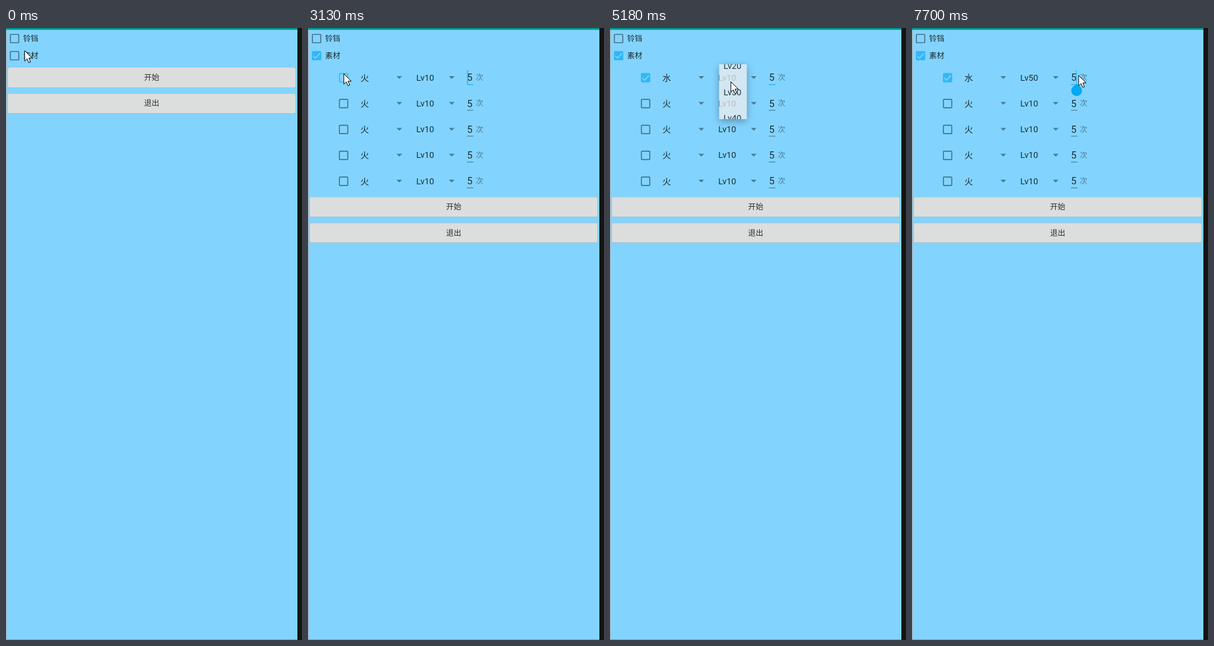
An HTML page for the animation above (8 s loop, 449 px wide and 928 px high).

```html
<!DOCTYPE html>
<html lang="zh">
<head>
<meta charset="utf-8">
<style>
html, body { margin: 0; width: 100%; height: 100%; overflow: hidden; background: #82d4ff; }
svg { display: block; }
#stage { width: 100%; height: 100%; }
text { font-family: Roboto, "Noto Sans CJK SC", "Noto Sans CJK", sans-serif; }
.soft { filter: drop-shadow(0 .7px .7px rgba(0, 0, 0, .42)); }
.deep { filter: drop-shadow(0 3px 6px rgba(0, 0, 0, .42)); }
</style>
</head>
<body>
<svg id="stage" viewBox="0 0 449 928"></svg>
<script>
const LOOP = 8000, BLUE = '#33b7f5', SKY = '#82d4ff', PITCH = 39.25, TOP = 55;
const ROWS = 5, FIRST = 75, BLINK = 480, GLIDE = 220;
const stage = document.getElementById('stage');

// When things get clicked, in ms
const EXPAND = 1820, CHECK_ROW = 3120, TAP = 6750, RETAP = 7550;

const elements = { items: ['火', '水', '雷', '风', '光', '暗', 'mana'], left: 73, width: 46, choice: 1, open: 3605, pick: 4370 };
const levels = { items: [1, 2, 3, 4, 5].map(n => `Lv${n}0`), left: 158, width: 42, choice: 4, open: 5075, pick: 6030 };

// Pointer stops: arrival time, x, y
const stops = [
  [0, 28, 34], [800, 18, 40], [2450, 54, 69], [3400, 88, 76], [4090, 109, 120], [4490, 168, 89],
  [4880, 183, 81], [5600, 200, 262], [5900, 176, 232], [6380, 251, 74], [6650, 246, 71], [7270, 252.5, 71.5]
];

// The caret blinks from the start of each span and freezes when a menu opens
const refocus = menu => menu.pick + 150;
const blinkSpans = [
  [EXPAND, elements.open + 150], [refocus(elements), levels.open], [refocus(levels), RETAP], [RETAP, LOOP]
];

const ramp = (t, from, length) => Math.min(1, Math.max(0, (t - from) / length));
const smooth = k => k * k * (3 - 2 * k);
const latest = (list, t) => list.filter(([at]) => at <= t).pop();
const tickOf = (t, click) => ramp(t, click, 300);
const chosen = (menu, t) => menu.items[t >= menu.pick + 240 ? menu.choice : 0];

const rect = (x, y, w, h, fill, more = '') =>
  `<rect x="${x}" y="${y}" width="${w}" height="${h}" fill="${fill}" ${more}/>`;

const label = (s, x, mid, size, ink = .8, more = '') =>
  `<text x="${x}" y="${mid + size * .365}" font-size="${size}" fill-opacity="${ink}" ${more}>${s}</text>`;

function checkbox(x, y, k) {
  const on = k > .05, size = Math.max(.15, k);
  const box = rect(x - 6.4, y - 6.4, 12.8, 12.8, on ? BLUE : 'none',
    `rx="1" stroke="${k ? BLUE : '#000'}" stroke-opacity="${k ? 1 : .5}" stroke-width="1.4"`);
  const tick = `<path d="M-5 .2L-1.7 3.6L5 -3.5" transform="translate(${x} ${y}) scale(${size})"
    fill="none" stroke="${SKY}" stroke-width="1.6"/>`;
  return box + (on ? tick : '');
}

const button = (s, y) =>
  rect(3, y - 15, 436, 30, '#dcdedd', 'rx="1.5" class="soft"') +
  label(s, 221, y, 11.5, .8, 'text-anchor="middle"');

const arrow = (x, y) =>
  `<path d="M${x - 4.3} ${y - 2}h8.6l-4.3 4.3z" fill="#000" fill-opacity=".42"/>`;

function row(i, t) {
  const y = FIRST + PITCH * i, first = i === 0;
  return checkbox(54, y + .4, first ? tickOf(t, CHECK_ROW) : 0) +
    label(first ? chosen(elements, t) : '火', 79.5, y, 13) + arrow(138.5, y) +
    label(first ? chosen(levels, t) : 'Lv10', 164.3, y, 13) + arrow(218, y) +
    label('5', 241.2, y, 14.7) +
    rect(241, y + 10, 10, first ? 1.5 : 1, first ? BLUE : '#000', `fill-opacity="${first ? 1 : .45}"`) +
    label('次', 254.5, y, 11.5, .42);
}

// Grows out of its row with the list centred in the opening, then fades away
function dropdown({ items, left, width, choice, open, pick }, t) {
  const p = ramp(t, open, 250);
  const alpha = Math.cbrt(p) * (1 - ramp(t, pick, 350) ** 2);
  if (!alpha) return '';
  const full = items.length * PITCH, h = full * p, dy = (h - full) / 2;
  const x = left + 13 * (1 - p);
  const glow = t >= pick ? rect(0, dy + choice * PITCH, width, PITCH, '#000', 'fill-opacity=".1"') : '';
  const list = items.map((s, i) => label(s, 6.8, dy + 20 + i * PITCH, 13, 1)).join('');
  return `<g opacity="${alpha}">` + rect(x, TOP, width, h, '#eee', 'rx="1" class="deep"') +
    `<svg x="${x}" y="${TOP}" width="${width}" height="${h}" overflow="hidden">${glow}${list}</svg></g>`;
}

function editMarks(t) {
  const [from, freeze] = latest(blinkSpans, t);
  const lit = (Math.min(t, freeze) - from) % (2 * BLINK) < BLINK;
  const moved = t >= RETAP, x = moved ? 249.7 : 242;
  const line = lit ? rect(x - .9, 64, moved ? 1.2 : 1.8, 20.5, BLUE) : '';
  const grip = `<path d="M${x} 84.6l4 4h-8z" fill="#03a9f4"/><circle cx="${x}" cy="95" r="8.2" fill="#03a9f4"/>`;
  return line + (t >= (moved ? RETAP : TAP) + 150 ? grip : '');
}

function cursor(t) {
  let [, x, y] = stops[0];
  for (const [at, toX, toY] of stops) {
    const k = smooth(ramp(t, at - GLIDE, GLIDE));
    x += (toX - x) * k;
    y += (toY - y) * k;
  }
  return `<path transform="translate(${x + .3} ${y + .3})"
    d="M0 0V15.8L3.7 12.4L6.3 18.3L8.9 17.2L6.4 11.4H11.3Z"
    fill="#fff" stroke="#111" stroke-width="1" stroke-linejoin="round"/>`;
}

function scene(t) {
  const open = t >= EXPAND, drop = open ? ROWS * PITCH : 0;
  let out = rect(0, 0, 449, 928, SKY) +
    rect(0, 0, 1, 928, '#a5acb0') + rect(0, 927, 442, 1, '#7b9cad') +
    rect(0, 0, 442, 2.7, '#009688') + rect(442, 0, 7, 928, '#141414') +
    checkbox(13, 16, 0) + label('铃铛', 26, 15.8, 11.5) +
    checkbox(13, 42, tickOf(t, EXPAND - 20)) + label('素材', 26, 42, 11.5);
  if (open) {
    for (let i = 0; i < ROWS; i++) out += row(i, t);
    out += editMarks(t);
  }
  out += button('开始', FIRST + drop) + button('退出', FIRST + PITCH + drop);
  return out + dropdown(elements, t) + dropdown(levels, t) + cursor(t);
}

let shown = '';
function frame(now) {
  const next = scene(now % LOOP);
  if (next !== shown) stage.innerHTML = shown = next;
  requestAnimationFrame(frame);
}
frame(0);
</script>
</body>
</html>
```
